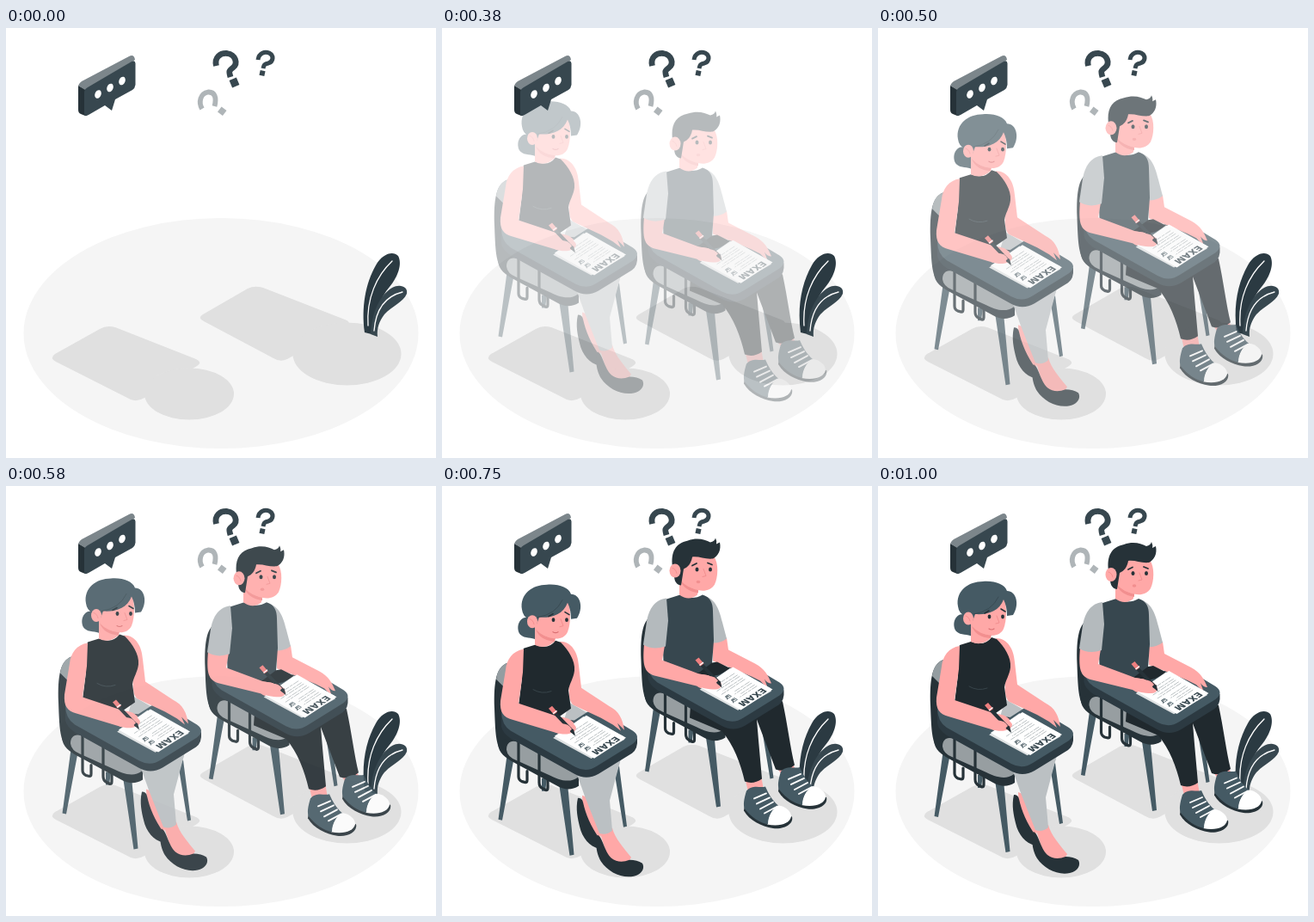
Write an HTML page that moves like this. It is 500x500 px and loops after 1040 ms.

```html
<!DOCTYPE html>
<html lang="en">
<head>
<meta charset="utf-8">
<title>Exam</title>
<style>
  html, body { margin: 0; width: 100%; height: 100%; overflow: hidden; background: #fff; }
  svg { display: block; width: 100vw; height: 100vh; }
  .ink { fill: #263238; }
  .night { fill: #20292e; }
  .slate { fill: #37474f; }
  .steel { fill: #455a64; }
  .skin { fill: #ffa8a7; }
  .blush { fill: #f28f8f; }
  .gray { fill: #b4babd; }
  .shade { fill: #e0e0e0; }
  .white { fill: #fff; }
  .line { fill: none; stroke-linecap: round; stroke-linejoin: round; }
  .title { font: 800 10.500px Inter, Arial, sans-serif; text-anchor: middle; }
</style>
</head>
<body>
<svg viewBox="0 0 500 500">
  <defs>
    <g id="chair">
      <path class="ink" d="M76 202C63 207 60 224 61 255C62 285 63 297 69 305L84 316V264L72 250L76 215Z"/>
      <path class="steel" d="M76 306L84 311L70 385L65.500 384ZM200 326L206 322L215 392L211 393ZM116 336H122L120 351H116ZM136 342H146L153.500 425L148.500 426Z"/>
      <path class="ink" d="M65 296C66 307 73 312 86 319L134 345C143 350 151 350 159 345V326L82 284Z"/>
      <path d="M75 303C75 295 80 291 88 294L150 326L158 331V335C148 343 134 337 126 333L86 315Q76 311 75 303Z" fill="#979ea1"/>
      <path class="line" d="M89 286V334Q89 338 93 340L97 341Q99 341 99 338V328M113 297V341Q113 346 117 348L121 350Q123 350 123 347V338" stroke="#263238" stroke-width="3.200"/>
    </g>

    <g id="desk">
      <path d="M69 258V276Q70 283 80 290L154 331Q168 339 182 331L221 307Q228 302 227 290L200 275Z" fill="#2c3a42"/>
      <path class="steel" d="M69 258L130 276Q146 276 155 268L169 259Q177 255 187 260L222 281Q232 288 222 296L180 322Q168 330 155 323L80 281Q69 274 69 258Z"/>
    </g>

    <g id="paper" transform="matrix(-.86 .56 -.87 -.49 214 289)">
      <path d="M0 3L3 -1L45 2L46 52L3 54Z" fill="#dfe2e3"/>
      <rect class="white" width="43" height="53"/>
      <text class="title" x="21.500" y="9.500" fill="#37474f">EXAM</text>
      <path class="line" d="M34 14h4v4h-4zM34 22h4v4h-4z" stroke="#455a64" stroke-width=".7"/>
      <path class="line" d="M35 16l1.500 1.500 3-4M35 24l1.500 1.500 3-4" stroke="#37474f" stroke-width=".8"/>
      <path d="M6 15H29M6 18H25M6 22H29M6 25H26M6 31H38M6 34H33M6 38H37M6 41H30M6 45H28" stroke="#b4babd" stroke-width=".8" stroke-dasharray="7 1 4 1"/>
    </g>

    <g id="pen">
      <path class="line" d="M130 259L151 281" stroke="#263238" stroke-width="4"/>
      <path d="M124 255L128 252L134 259L130 262Z" fill="#ee7f7f"/>
      <path d="M129 261L133.500 257.500" stroke="#fff" stroke-width="1.200"/>
      <path class="ink" d="M149 282L153 279L155 287Z"/>
    </g>

    <g id="sneaker">
      <path class="ink" d="M352 375L351 382C358 394 371 400 385 402.500C399 404 409 397 407 389Z"/>
      <path class="white" d="M378 398C379 388 384 379 391 376C400 377 406 383 406 389C404 397 393 401 378 398Z"/>
      <path class="steel" d="M354 359C351 369 350 375 352 380C360 390 369 396 379 398C379 388 384 380 391 376C384 370 380 363 376 354C370 356 361 351 354 359Z"/>
      <path class="line" d="M363 368L377 362M366 374L381 367M370 380L385 372M375 385L390 377" stroke="#fff" stroke-width="1.900"/>
    </g>
  </defs>

  <ellipse cx="250" cy="355" rx="229.500" ry="134" fill="#f5f5f5"/>
  <g class="shade">
    <path d="M57 379L109 350Q117 345 127 348L221 385Q229 389 222 393L161 430Q153 435 145 432L58 388Q50 384 57 379Z"/>
    <ellipse cx="213" cy="425.500" rx="52" ry="30"/>
    <path d="M229 333L281 303Q289 299 299 302L394 339Q402 342 397 346L327 385Q319 389 311 384L230 341Q222 337 229 333Z"/>
    <ellipse cx="396.500" cy="379" rx="63" ry="36.500"/>
  </g>

  <path d="M417 354C413 325 418 297 430 276C438 262 450 259 456 265C461 274 456 289 446 301C435 313 428 335 425 356Z" fill="#2b3a42"/>
  <path class="slate" d="M424 356C425 332 434 311 449 302C458 297 468 301 466 309C462 319 449 323 440 333C434 341 431 349 432 359Z"/>
  <path class="line" d="M421 346C419 314 431 288 449 271M428 352C430 327 441 312 461 307" stroke="#fff" stroke-width="1.300"/>

  <g id="man">
    <use href="#chair" x="170.500" y="-48"/>
    <path class="skin" d="M352 343L371 341L374 358Q365 366 356 360ZM389 331L408 328L413 338Q403 344 394 339Z"/>
    <path class="night" d="M290 244L320 215L345 230L396 255C402 283 405 309 410 329Q399 338 388 334L366 276L368 300L372 345Q362 352 352 348C347 326 339 306 326 290L288 274Z"/>
    <use href="#sneaker"/>
    <use href="#sneaker" x="40" y="-22.500"/>
    <use href="#desk" x="170.500" y="-48"/>

    <path class="skin" d="M315 184L331 181L333 195L364 211C375 217 379 224 383 234Q378 234 375 229L379 240L370 231L360 226L336 216L315 208Z"/>
    <path class="gray" d="M307 133C319 137 323 151 326 163L331 182Q323 188 314 187Z"/>
    <path class="slate" d="M258 137L277 131Q291 138 303 131C312 134 315 140 315 150L316 184L314 211L302 226L258 225L256 160Z"/>
    <path class="night" d="M314 210L320 209L336 217L322 224L302 228L260 225L257 215L298 222Z"/>
    <path class="skin" d="M235 188L259 190L256 207L299 223C308 224 316 226 321 230C327 235 324 241 317 241C309 243 300 240 296 237L247 225C235 221 233 213 235 188Z"/>
    <path class="gray" d="M261 135C245 137 240 151 238 162L234 189Q245 196 260 191L263 161Z"/>

    <path class="skin" d="M276 105V131Q287 139 297 131V120Z"/>
    <path class="blush" d="M277 114Q286 124 298 125V129Q281 126 277 114Z"/>
    <path class="skin" d="M276 91C280 82 301 80 316 86C322 94 321 111 317 119C311 129 296 128 286 120L276 110Z"/>
    <path class="ink" d="M268 98C266 82 271 71 286 68C297 64 306 67 312 70Q317 69 318 65Q320 69 319 72L323 70C325 79 321 86 315 89C306 90 299 86 291 87C290 94 286 99 281 101L278 120C271 119 270 113 270 108Z"/>
    <ellipse class="skin" cx="271" cy="103" rx="6.500" ry="8"/>
    <path class="line" d="M268 100Q272 101 273 106" stroke="#f28f8f"/>
    <g class="ink"><ellipse cx="296.500" cy="101.500" rx="2" ry="2.500"/><ellipse cx="312" cy="101.500" rx="2" ry="2.500"/></g>
    <path class="line" d="M291 97L296 94.500M309 94L314 96" stroke="#263238" stroke-width="1.800"/>
    <path class="line" d="M304 101L307 109L303 110" stroke="#f28f8f"/>
    <ellipse class="blush" cx="298" cy="116" rx="2.300" ry="1.700"/>
    <use href="#paper" transform="translate(170.500 -48)"/>
    <path class="skin" d="M298 223C308 224 317 226 322 230C327 235 325 241 318 241C309 241 300 239 296 236Z"/>
    <use href="#pen" x="170.500" y="-48"/>
    <path class="skin" d="M305 226Q316 224 321 231L317 235L308 232Z"/>
  </g>

  <g id="woman">
    <use href="#chair"/>
    <path d="M76 202C68 205 64 212 63 221L72 230L75 212Z" fill="#949da1"/>
    <path class="skin" d="M163 356L173 360L187 396L182 410C173 396 163 379 163 356Z"/>
    <path class="ink" d="M158 359C155 372 158 383 160 392C163 406 172 415 182 418L183 406C173 392 167 378 164 364Q163 359 158 359Z"/>
    <path d="M165 325L208 313L200 340L186 374L166 354Z" fill="#b0b6b9"/>
    <path class="skin" d="M183 397L198 394C201 406 212 418 220 428L212 441L194 433Z"/>
    <path d="M140 275L148 248L169 260L158 285L208 313L195 362L198 397Q191 403 183 400L166 357L156 329Z" fill="#bbc0c3"/>
    <path class="ink" d="M181 402C177 414 181 427 185 433C193 445 209 453 223 450C233 448 236 440 233 435Q227 431 218 431Q206 436 197 429C188 420 187 405 181 402Z"/>
    <use href="#desk"/>

    <path class="skin" d="M137 177C151 177 158 190 159 205L162 231L194 252C206 258 210 267 212 280L204 272L208 281L199 274L185 266L153 251Q146 247 148 222Z"/>
    <path class="night" d="M95 185L108 181Q124 187 132 176L138 178C147 187 155 199 154 211C153 220 148 226 147 234L150 255L134 266L89 252L93 220L90 200Z"/>
    <path class="line" d="M106 233Q116 239 127 235" stroke="#37444a"/>
    <path class="skin" d="M95 186C82 188 75 198 74 210L68 246C67 259 71 265 82 268L132 283C142 286 154 285 156 279C155 270 147 265 137 265L89 249L94 213Z"/>

    <path class="steel" d="M99 149C88 149 86 163 91 169C96 174 105 172 109 175V151Z"/>
    <path class="skin" d="M108 155V181Q120 187 131 177V165Z"/>
    <path class="blush" d="M109 163Q118 173 132 173L131 177Q114 176 109 163Z"/>
    <path class="skin" d="M107 135L146 126C150 139 150 156 146 166C141 177 126 175 116 168L107 158Z"/>
    <path class="steel" d="M93 140C90 122 105 111 122 111C136 110 147 114 150 122C161 122 165 138 157 150L150 151Q150 140 146 132C141 146 127 150 113 149L110 157L101 151Q94 148 93 140Z"/>
    <ellipse class="skin" cx="105" cy="154" rx="6" ry="7.500"/>
    <path class="line" d="M102 151Q106 152 107 157" stroke="#f28f8f"/>
    <path class="line" d="M111 149Q132 146 140 129" stroke="#37474f" stroke-width=".8"/>
    <g class="ink"><ellipse cx="129.500" cy="152" rx="1.900" ry="2.400"/><ellipse cx="145" cy="152" rx="1.900" ry="2.400"/></g>
    <path class="line" d="M124 148L129 145M143 143L148 146" stroke="#263238" stroke-width="1.600"/>
    <path class="line" d="M138 151L141 159L137 160" stroke="#f28f8f"/>
    <path class="line" d="M129 166Q132 168 135 166" stroke="#d96f72" stroke-width="1.200"/>
    <use href="#paper"/>
    <path class="skin" d="M128 271C138 264 152 269 156 277C156 284 144 287 132 283Z"/>
    <use href="#pen"/>
    <path class="skin" d="M135 273Q146 271 151 279L147 283L138 280Z"/>
  </g>

  <path class="ink" d="M84 67L92 71V102L87 100Q84 99 84 95Z"/>
  <path d="M84 67Q85 64 88 62L143 33Q149 30 150 37L92 72Z" fill="#7c868b"/>
  <path class="slate" d="M91 75Q91 71 95 69L146 39Q150 37 150.500 41V66Q150 70 147 72L127 83L123 96L115 90L96 101Q91 104 91 99Z"/>
  <g class="white">
    <ellipse cx="107" cy="77" rx="3.600" ry="5" transform="rotate(22 107 77)"/>
    <ellipse cx="121" cy="69.500" rx="3.600" ry="5" transform="rotate(22 121 69.500)"/>
    <ellipse cx="135" cy="61.500" rx="3.600" ry="5" transform="rotate(22 135 61.500)"/>
  </g>

  <g fill="none" stroke="#37474f">
    <path d="M244.500 44C242 34 249 29 257 29.500C267 31 270 41 264 46C259 50 259 50 261 57" stroke-width="6.800"/>
    <path d="M293 37C294 29 301 27 306 29C312 32 311 39 305 41C300 42 300 43 299 47" stroke-width="5"/>
    <path d="M228 94C223.500 86 226 76 235 74.500C243 74 245 81 242.500 91" stroke="#afb5b8" stroke-width="5.800"/>
  </g>
  <rect class="slate" x="261" y="59" width="9" height="9" transform="rotate(-23 265.500 63.500)"/>
  <rect class="slate" x="295" y="49.500" width="6" height="6" transform="rotate(12 298 52.500)"/>
  <rect x="247.500" y="93" width="7.500" height="7.500" transform="rotate(38 251.250 96.750)" fill="#afb5b8"/>
</svg>
<script>
  const LOOP = 1040, FPS = 24, FIRST = 5;
  const actors = [["woman", -60], ["man", 74]]
    .map(([id, drop]) => ({ el: document.getElementById(id), drop }));

  const bezier = (a, b, u) => 3 * (1 - u) ** 2 * u * a + 3 * (1 - u) * u * u * b + u ** 3;

  // cubic-bezier(.36, -.01, .5, 1.38), solved by bisection
  function ease(x) {
    if (x >= 1) return 1;
    let lo = 0, hi = 1;
    for (let i = 0; i < 24; i++) {
      const mid = (lo + hi) / 2;
      if (bezier(.36, .5, mid) < x) lo = mid; else hi = mid;
    }
    return bezier(-.01, 1.38, lo);
  }

  function draw(ms) {
    const step = Math.floor((ms % LOOP + 4) * FPS / 1000);
    const y = ease((step + 1) / FPS);
    const alpha = step < FIRST ? 0 : Math.min(1, y * y);
    for (const { el, drop } of actors) {
      el.setAttribute("transform", `translate(0 ${(drop * (1 - y)).toFixed(2)})`);
      el.setAttribute("opacity", alpha.toFixed(3));
    }
  }

  const start = performance.now();
  function tick() {
    draw(performance.now() - start);
    requestAnimationFrame(tick);
  }
  tick();
</script>
</body>
</html>
```
